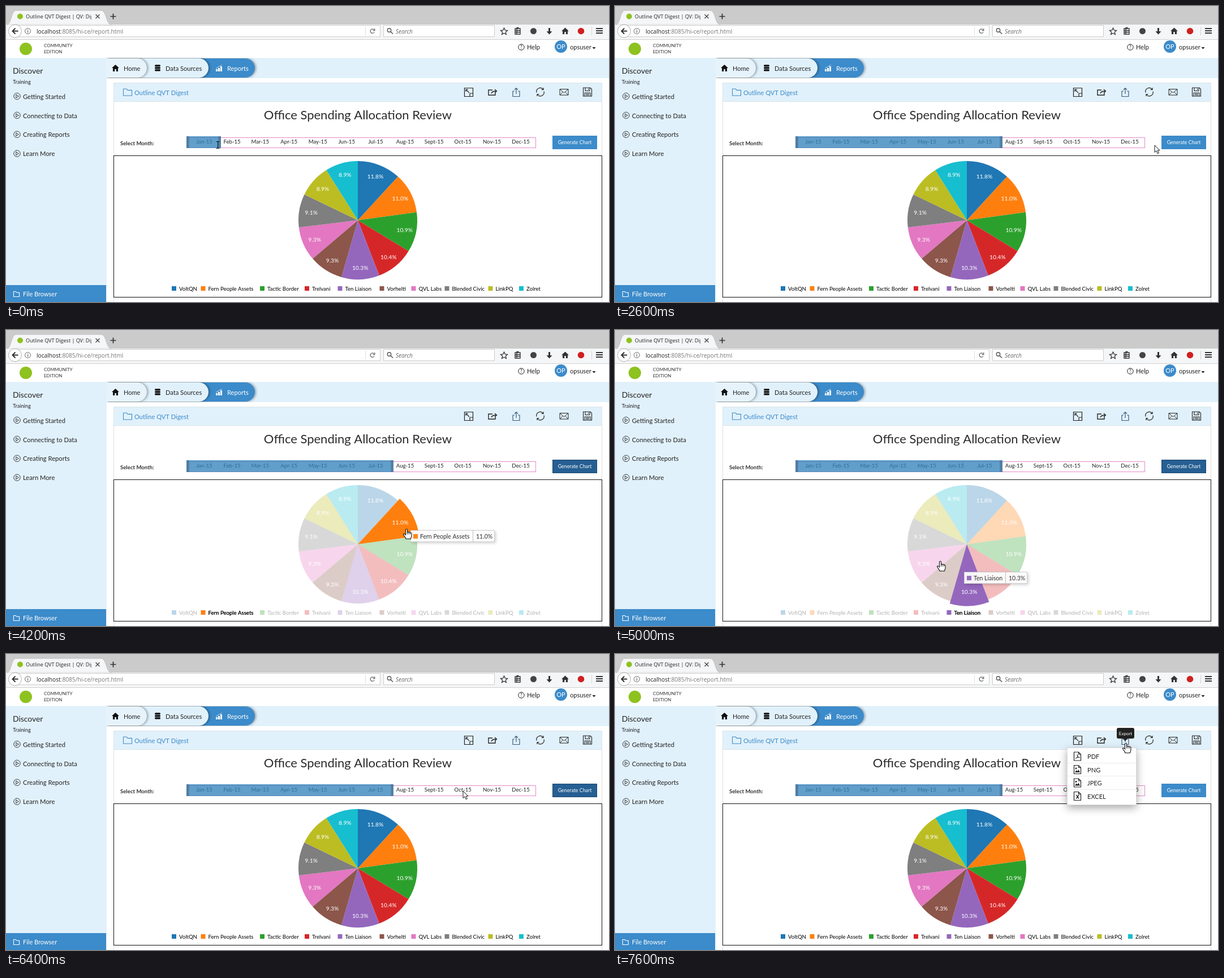
These frames come from a looping animation (1066 by 525 pixels, 8000 ms). An HTML page with a canvas:

```html
<!DOCTYPE html>
<html lang="en">
<head>
<meta charset="utf-8">
<title>Expense report</title>
<style>
html, body { margin: 0; width: 100%; height: 100%; overflow: hidden; background: #fff; }
canvas { display: block; }
</style>
</head>
<body>
<canvas id="stage" width="1066" height="525"></canvas>
<script>
const ctx = document.getElementById('stage').getContext('2d');
const LOOP = 8000, STEP = 200;
const LATO = 'Lato, sans-serif', UI = '"Open Sans", sans-serif';
const BLUE = '#3c8bca', PALE = '#e1f1fb', INK = '#222';

const slices = [
  ['VoltQN', 11.8, '#1f77b4', 293],
  ['Fern People Assets', 11.0, '#ff7f0e', 344.5],
  ['Tactic Border', 10.9, '#2ca02c', 449],
  ['Trelvani', 10.4, '#d62728', 528],
  ['Ten Liaison', 10.3, '#9467bd', 586.5],
  ['Vorhelti', 9.3, '#8c564b', 660.5],
  ['QVL Labs', 9.3, '#e377c2', 716.5],
  ['Blended Civic', 9.1, '#7f7f7f', 775.5],
  ['LinkPQ', 8.9, '#bcbd22', 852.5],
  ['Zolret', 8.9, '#17becf', 907]
].map(([name, value, color, x]) => ({ name, value, color, x, label: value.toFixed(1) + '%' }));
const total = slices.reduce((sum, s) => sum + s.value, 0);

const months = 'Jan Feb Mar Apr May Jun Jul Aug Sept Oct Nov Dec'.split(' ');
const monthX = [350.5, 399.5, 449.2, 500.2, 551.2, 602.3, 653.5, 705.5, 756.7, 807.7, 859, 910];

// time, x, y, shape
const pointer = [
  [2000, 679, 246, 'beam'], [2200, 735, 246, 'arrow'], [2600, 954, 247, 'arrow'],
  [2800, 990, 243, 'hand'], [3200, 1003, 241, 'hand'], [3600, 1003, 241, 'hand'],
  [3800, 920, 275, 'arrow'], [4000, 800, 325, 'arrow'], [4200, 708, 353, 'hand'],
  [4600, 704, 383, 'hand'], [4800, 684, 402, 'hand'], [5000, 575, 410, 'hand'],
  [5200, 552, 402, 'hand'], [5400, 550, 375, 'hand'], [5600, 566, 338, 'hand'],
  [5800, 591, 317, 'hand'], [6000, 612, 297, 'hand'], [6200, 730, 262, 'arrow'],
  [6600, 885, 224, 'arrow'], [6800, 899, 192, 'arrow'], [7000, 903, 168, 'arrow'],
  [7200, 903, 158, 'hand']
];
// time, slice, tooltip x, tooltip y
const hovers = [
  [0, -1], [4200, 1, 715, 355], [4400, 1, 714, 371], [4600, 2, 712, 388], [4800, 2, 694, 408],
  [5000, 4, 617, 429], [5200, 6, 562, 420], [5400, 7, 556, 393], [5600, 8, 566, 356],
  [5800, 8, 583, 335], [6000, 9, 612, 315], [6200, -1]
];
const lastBefore = (keys, t) => keys.filter(k => k[0] <= t).pop();

function rect(x, y, w, h, color) {
  ctx.fillStyle = color;
  ctx.fillRect(x, y, w, h);
}
function frame(x, y, w, h, color) {
  ctx.strokeStyle = color;
  ctx.lineWidth = 1;
  ctx.strokeRect(x + .5, y + .5, w - 1, h - 1);
}
function disc(x, y, r, color) {
  ctx.fillStyle = color;
  ctx.beginPath();
  ctx.arc(x, y, r, 0, 7);
  ctx.fill();
}
function ring(x, y, r, color, width = 1) {
  ctx.strokeStyle = color;
  ctx.lineWidth = width;
  ctx.beginPath();
  ctx.arc(x, y, r, 0, 7);
  ctx.stroke();
}
// Draws SVG path data at an offset.
function shape(d, x, y, fill, stroke, width = 1) {
  const p = new Path2D(d);
  ctx.save();
  ctx.translate(x, y);
  if (fill) { ctx.fillStyle = fill; ctx.fill(p); }
  if (stroke) { ctx.strokeStyle = stroke; ctx.lineWidth = width; ctx.stroke(p); }
  ctx.restore();
}
const line = (d, x, y, color = INK, width = 1.2) => shape(d, x, y, null, color, width);
// Baselines sit on whole pixels so that small type stays crisp.
function text(str, x, y, size, color = INK, align = 'left', font = LATO, style = '') {
  ctx.font = `${style} ${size}px ${font}`;
  ctx.fillStyle = color;
  ctx.textAlign = align;
  ctx.fillText(str, x, Math.round(y));
}
function shadow(color, blur, dx, dy, draw) {
  ctx.save();
  Object.assign(ctx, { shadowColor: color, shadowBlur: blur, shadowOffsetX: dx, shadowOffsetY: dy });
  draw();
  ctx.restore();
}

function browser() {
  rect(0, 0, 1066, 34, '#cbcbcb');
  rect(0, 33, 1066, 27, '#f5f6f7');
  rect(0, 59, 1066, 1, '#cfcfcf');
  shape('M0 33C8 32 7 8 16 8H166C176 8 174 32 184 33Z', 2, 0, '#f5f6f7', '#b8b8b8', .7);
  rect(4, 33, 180, 2, '#f5f6f7');
  disc(25, 18.5, 5, '#8dc21f');
  ctx.save();
  ctx.beginPath();
  ctx.rect(34, 8, 117, 22);
  ctx.clip();
  text('Outline QVT Digest | QV: Dig', 35, 22, 9, INK, 'left', UI);
  ctx.restore();
  line('M-3.5-3.5L3.5 3.5M3.5-3.5L-3.5 3.5', 162, 18.5, '#444', 1.3);
  line('M-5 0H5M0-5V5', 189.5, 18.5, '#333', 1.7);

  rect(22, 34, 640, 21, '#fff');
  frame(22, 34, 640, 21, '#cdcdcd');
  rect(667, 34, 197, 21, '#fff');
  frame(667, 34, 197, 21, '#cdcdcd');
  disc(16, 44.5, 11.5, '#fff');
  ring(16, 44.5, 11.5, '#b0b0b0');
  line('M5 0H-5M0-5L-5 0L0 5', 16.5, 44.5, '#333', 2);
  ring(38.5, 44.5, 5, '#666');
  rect(38, 43.5, 1.2, 4, '#666');
  rect(38, 41.5, 1.2, 1.2, '#666');
  text('localhost', 54, 49, 10.2, INK, 'left', UI);
  text(':8085/hi-ce/report.html', 54 + ctx.measureText('localhost').width, 49, 10.2, '#777', 'left', UI);
  rect(635, 37, 1, 15, '#ddd');
  line('M3 2A3.7 3.7 0 1 1 2.5-2.6M3.8-4.5V-1H.5', 648, 44.5, '#666', 1.3);
  ring(677.5, 43, 3.2, '#555', 1.4);
  line('M0 0L4 4', 680, 45.5, '#555', 1.6);
  text('Search', 689, 49, 10.1, '#666', 'left', UI, 'italic');

  line('M0-6L1.8-2L6-1.6L2.8 1.3L3.8 5.5L0 3.2L-3.8 5.5L-2.8 1.3L-6-1.6L-1.8-2Z', 880.5, 45, '#333', 1.3);
  line('M-4.5-4.5H4.5V5.5H-4.5ZM-2-6H2M-4-1H4M-4 2H4M-1.5-4V5', 904.5, 44.5, '#333', 1.4);
  disc(932.5, 44.5, 5.5, '#444');
  shape('M-1.5-6H1.5V0H5L0 5.5L-5 0H-1.5Z', 960.5, 45, '#333');
  shape('M0-6L6.5 0H4.5V5.5H1.3V1.5H-1.3V5.5H-4.5V0H-6.5Z', 988.5, 44.5, '#333');
  disc(1016.5, 44.5, 5.8, '#cf2020');
  rect(1035, 37, 1, 15, '#d2d2d2');
  for (const y of [39, 43, 47]) rect(1043, y, 12, 2, '#333');
}

function pill(right, color) {
  shadow('rgba(0,0,0,.36)', 4, 2, 0, () =>
    shape(`M178 93H${right - 17}A17 17 0 0 1 ${right - 17} 127H178Z`, 0, 0, color));
}
const folder = (x, y, w, h, color) =>
  line(`M0 0H${w * .38}L${w * .5} ${h * .2}H${w}V${h}H0Z`, x, y, color, 1.1);

function appChrome() {
  rect(0, 60, 1066, 465, '#fff');
  disc(35, 76, 11, '#8dc21f');
  text('COMMUNITY', 67, 73, 8, '#333');
  text('EDITION', 67, 84, 8, '#333');
  ring(911, 73, 5.2, INK);
  text('?', 911, 76, 8.5, INK, 'center');
  text('Help', 921, 77, 11.1);
  disc(981, 72, 11, BLUE);
  text('OP', 981, 76, 11, '#fff', 'center');
  text('opsuser', 997, 77, 11);
  shape('M0 0H6L3 3.5Z', 1036.5, 73, INK);

  rect(0, 92, 178, 433, PALE);
  rect(178, 92, 888, 36, PALE);
  text('Discover', 12, 120, 13.9);
  text('Training', 12, 138, 9.2);
  ['Getting Started', 'Connecting to Data', 'Creating Reports', 'Learn More'].forEach((item, i) => {
    const y = 160 + i * 33.9;
    ring(19.5, y, 5.7, '#333');
    line('M-1.7-3L2.8 0L-1.7 3Z', 19.5, y, '#333', 1);
    text(item, 30, y + 4.6, 11.2);
  });
  rect(0, 495, 177, 30, BLUE);
  folder(13.5, 506.5, 10, 9, '#fff');
  text('File Browser', 30, 515, 11, '#fff');

  ctx.save();
  ctx.beginPath();
  ctx.rect(178, 92, 300, 36);
  ctx.clip();
  pill(440, BLUE);
  pill(358, PALE);
  pill(249, '#e6f3fb');
  ctx.restore();
  shape('M0-6L6.5 0H4.5V6H1.3V2H-1.3V6H-4.5V0H-6.5Z', 193.5, 110, '#111');
  for (const y of [106, 110, 114]) {
    ctx.fillStyle = '#111';
    ctx.beginPath();
    ctx.roundRect(263, y - 1.7, 10, 3.2, 1.5);
    ctx.fill();
  }
  [4, 6, 9].forEach((h, i) => rect(371 + i * 4, 116 - h, 3, h, '#fff'));
  line('M0 3L5 0L10-3', 371.5, 107.5, '#fff', .8);
  text('Home', 208, 115, 11);
  text('Data Sources', 282, 115, 11.1);
  text('Reports', 391, 115, 11.1, '#fff');
}

function panel() {
  rect(190, 136, 1, 389, '#ddd');
  rect(1053, 136, 1, 389, '#ddd');
  rect(190, 136, 864, 33, PALE);
  frame(190, 136, 864, 34, '#d8e4ea');
  folder(207.5, 147, 15, 12, BLUE);
  text('Outline QVT Digest', 227, 158, 11.1, BLUE);
  line('M-7.5-7.5H7.5V7.5H-7.5ZM2 2H7.5M2 2V7.5M-5-5L1 1M-5-1V-5H-1', 818, 153);
  line('M3 5H-7V-4H0M5 1V5H2M-2 2C-1-1 2-2 6-2M4-5L7.5-2L4 1', 860, 153, INK, 1.4);
  line('M-3-2H-6V7.5H6V-2H3M0 3V-7M-3-4.5L0-7.5L3-4.5', 902, 153, '#3a5c78');
  line('M-6.5 1A6.5 6.5 0 0 1 5-4.5M5.5-7.5V-4H2M6.5-1A6.5 6.5 0 0 1-5 4.5M-5.5 7.5V4H-2', 944.5, 152.5);
  line('M-7.5-5H7.5V5.5H-7.5ZM-7.5-5L0 1.5L7.5-5M-7.5 5.5L-2 0M7.5 5.5L2 0', 986.5, 152.5, INK, 1);
  line('M-7.5-7.5H5L7.5-5V7.5H-7.5ZM-4-7V-2H4V-7M1.5-6V-3.5M-5 7V1.5H5V7M-3 3.5H3M-3 5.5H3', 1028, 152.5, INK, 1.1);
  text('Office Spending Allocation Review', 622, 201, 22, '#2b2b2b', 'center');
  text('Select Month:', 202, 247, 9.6, '#333', 'left', LATO, 'bold');
}

function monthPicker(edge) {
  months.forEach((m, i) => text(m + '-15', monthX[i], 244, 9.6, INK, 'center'));
  frame(320, 233, 617, 19, '#e58ac8');
  rect(319, 231, edge - 319, 21, 'rgba(53,132,188,.78)');
  for (const x of [319, edge - 5]) rect(x, 231, 5, 21, 'rgba(70,100,130,.5)');
}

function button(t) {
  const pressed = t >= 3400 && t < 7400, hovered = t >= 2800 && t < 3400;
  rect(966, 230, 79, 24, pressed ? '#265f92' : hovered ? '#2e70a8' : BLUE);
  if (pressed) frame(966, 230, 79, 24, '#1b4a72');
  text('Generate Chart', 1005.5, 245, 8.8, '#fff', 'center');
}

function pie(active) {
  const cx = 622, cy = 380;
  frame(190, 265, 864, 252, '#111');
  let start = -Math.PI / 2;
  slices.forEach((s, i) => {
    const end = start + s.value / total * 2 * Math.PI, mid = (start + end) / 2;
    const dim = active >= 0 && i !== active;
    ctx.globalAlpha = dim ? .3 : 1;
    ctx.fillStyle = s.color;
    ctx.beginPath();
    ctx.moveTo(cx, cy);
    ctx.arc(cx, cy, i === active ? 109.5 : 105, start, end);
    ctx.fill();
    rect(s.x, 497, 8, 8, s.color);
    text(s.name, s.x + 13, 505, 9.6, '#000');
    if (i === active) text(s.name, s.x + 13, 505, 9.6, '#000');
    ctx.globalAlpha = 1;
    text(s.label, cx + .5 + 84 * Math.cos(mid), cy + 84 * Math.sin(mid) + 4, 10.3, '#fff', 'center');
    start = end;
  });
}

function tooltip(s, x, y) {
  ctx.font = `10.5px ${LATO}`;
  const split = Math.round(22 + ctx.measureText(s.name).width);
  const width = Math.round(split + 10 + ctx.measureText(s.label).width);
  ctx.globalAlpha = .93;
  shadow('rgba(0,0,0,.2)', 5, 2, 2, () => rect(x, y, width, 21, '#fff'));
  frame(x, y, width, 21, '#ccc');
  rect(x + split, y, 1, 21, '#bbb');
  rect(x + 5, y + 7, 8, 8, s.color);
  text(s.name, x + 17, y + 15, 10.5);
  text(s.label, x + split + 6, y + 15, 10.5);
  ctx.globalAlpha = 1;
}

function exportMenu() {
  shadow('rgba(0,0,0,.35)', 14, 0, 5, () => rect(799, 166, 123, 102, '#fff'));
  frame(799, 166, 123, 102, '#ddd');
  ['PDF', 'PNG', 'JPEG', 'EXCEL'].forEach((name, i) => {
    const y = 181.5 + i * 23.5;
    if (i) rect(800, Math.round(y - 12.5), 121, 1, '#ececec');
    line('M-6-7.5H2L6-3.5V7.5H-6ZM2-7.5V-3.5H6', 817.5, y, INK, 1.2);
    if (name === 'PDF') line('M-3.5 4.5C0 2 1-1 0-3C-1-1 1 2 4 2C1 1-2 2-3.5 4.5', 817.5, y, INK, 1);
    else if (name === 'EXCEL') line('M-2-2L2.5 4.5M2.5-2L-2 4.5', 817.5, y, INK, 1.4);
    else {
      shape('M-4.5 5L-2 1L0 3L2 0L4.5 5Z', 817.5, y, INK);
      disc(815, y - 2, 1.4, INK);
    }
    text(name, 835, y + 4.7, 11.1);
  });
}

function exportHint() {
  ctx.fillStyle = '#222';
  ctx.beginPath();
  ctx.roundRect(887, 131, 31, 19, 3);
  ctx.fill();
  shape('M-4 0H4L0 4.5Z', 902, 150, '#222');
  text('Export', 902.5, 144, 8, '#fff', 'center');
}

const cursors = {
  beam(x, y) {
    line('M-3-6H-1L0-5L1-6H3M0-5V5M-3 6H-1L0 5L1 6H3', x + .5, y + .5, '#111', 1.1);
  },
  arrow(x, y) {
    shape('M0 0V12.5L3 9.8L5.2 14.7L7.4 13.7L5.2 9H9Z', x, y, '#fff', '#111', 1);
  },
  hand(x, y) {
    shape('M-1.5 1.5C-1.5-.6 1.5-.6 1.5 1.5V6C2 5 3.6 5 4 6C5 5 6.5 5.5 6.7 6.6C8 6.2 9 7 9 8.5V12' +
      'C9 14 7.5 15 7.5 17.5H-1C-1 15-5.5 11.5-5.5 9.5C-5 8-3 8.5-1.5 10.5Z', x, y, '#fff', '#111', 1.1);
    line('M1.5 6V9.5M4 6.5V9.5M6.6 7V9.5', x, y, '#111', .9);
  }
};

function pointerAt(t, edge) {
  if (t <= 2000) return [edge - 6, 246, 'beam'];
  const from = lastBefore(pointer, t);
  const to = pointer[pointer.indexOf(from) + 1] || from;
  const k = to === from ? 0 : (t - from[0]) / (to[0] - from[0]);
  return [from[1] + (to[1] - from[1]) * k, from[2] + (to[2] - from[2]) * k, from[3]];
}

function draw(now) {
  const t = Math.floor(now % LOOP / STEP) * STEP;
  const drag = Math.min(Math.max((t - 400) / 1400, 0), 1);
  const edge = Math.round(380 + 305 * drag ** 2.64);
  const [, active, tipX, tipY] = lastBefore(hovers, t);

  browser();
  appChrome();
  panel();
  monthPicker(edge);
  button(t);
  pie(active);
  if (active >= 0) tooltip(slices[active], tipX, tipY);
  if (t >= 7400) exportMenu();
  if (t >= 7200) exportHint();
  const [x, y, kind] = pointerAt(t, edge);
  cursors[kind](Math.round(x), Math.round(y));
}

const began = performance.now();
function tick() {
  draw(performance.now() - began);
  requestAnimationFrame(tick);
}
tick();
</script>
</body>
</html>
```
